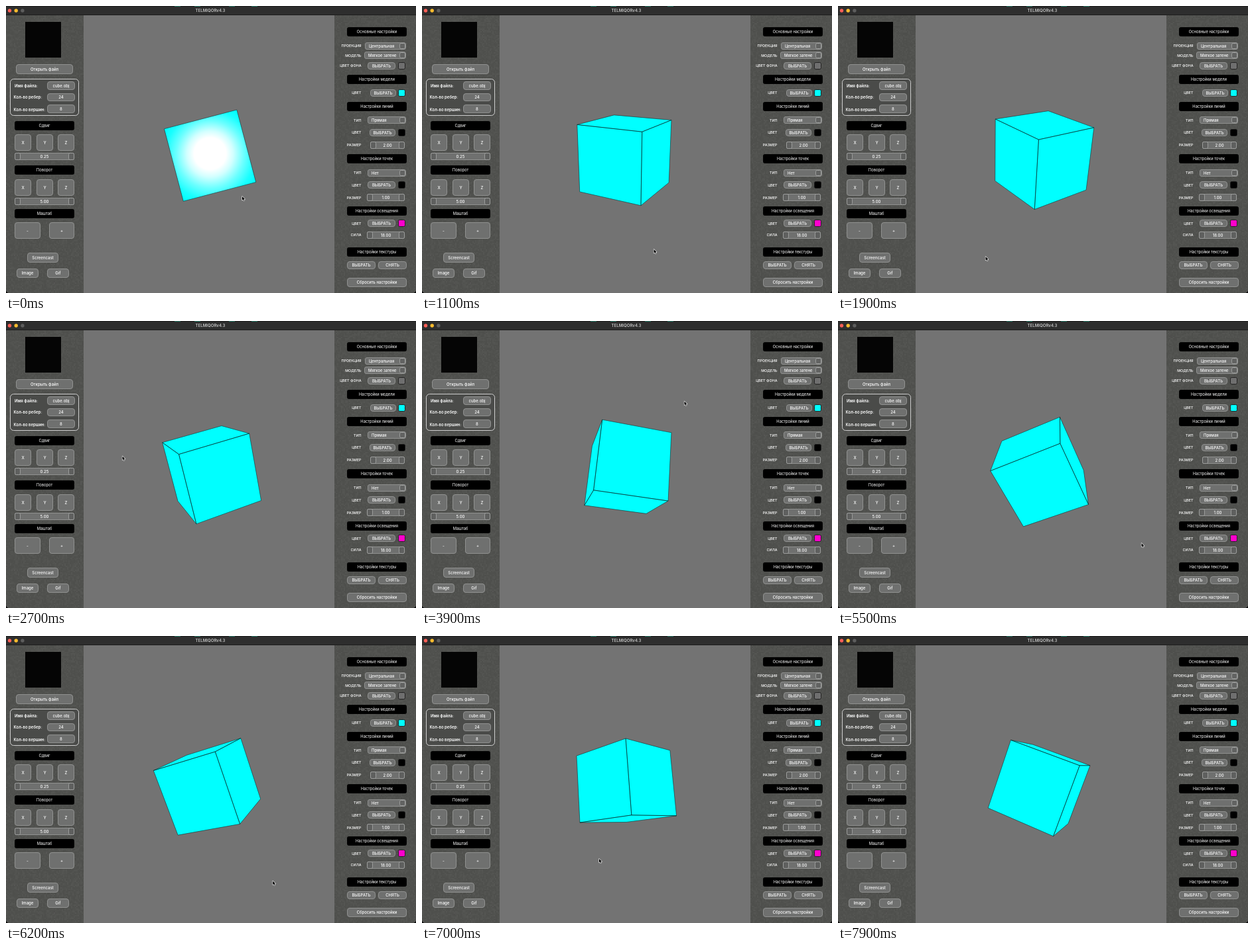
Animation, 618 px wide and 434 px high, one loop 8.5 s. Source, as an HTML page with a canvas:

```html
<!DOCTYPE html>
<html lang="ru">
<head>
<meta charset="utf-8">
<title>Cube</title>
<style>
html, body { margin: 0; width: 100%; height: 100%; overflow: hidden; background: #000; }
canvas { display: block; width: 618px; height: 434px; }
</style>
</head>
<body>
<canvas id="stage" width="618" height="434"></canvas>
<script>
const W = 618, H = 434, LOOP = 8500, STEP = 100;
const FONT = 'Inter, Roboto, sans-serif';
const FILL = '#6f706f', LINE = '#969796';
const view = document.getElementById('stage').getContext('2d');
const panel = document.createElement('canvas');
panel.width = W;
panel.height = H;
const g = panel.getContext('2d');

// ---------- interface helpers ----------
function box(x1, y1, x2, y2, r, fill, line) {
  g.beginPath();
  g.roundRect(x1 + .5, y1 + .5, x2 - x1 - 1, y2 - y1 - 1, r);
  if (fill) { g.fillStyle = fill; g.fill(); }
  if (line) { g.strokeStyle = line; g.lineWidth = .9; g.stroke(); }
}

function label(text, x, y, align = 'center', size = 6, weight = 500, color = '#fff') {
  g.font = `${weight} ${size}px ${FONT}`;
  g.textAlign = align;
  g.textBaseline = 'middle';
  g.fillStyle = color;
  g.fillText(text, x, y + .4);
}

function button(text, x1, y1, x2, y2, size) {
  box(x1, y1, x2, y2, 3.5, FILL, LINE);
  label(text, (x1 + x2) / 2, (y1 + y2) / 2, 'center', size);
}

function header(text, x, y) {
  box(x, y, x + 90, y + 14, 2, '#000', '#000');
  label(text, x + 45, y + 7, 'center', 5.8, 400);
}

function spin(text, x1, y1, x2, y2) {
  box(x1, y1, x2, y2, 2, FILL, LINE);
  box(x1, y1, x1 + 9, y2, 2, '#5f605f', '#a2a3a2');
  box(x2 - 9, y1, x2, y2, 2, '#5f605f', '#a2a3a2');
  label(text, (x1 + x2) / 2, (y1 + y2) / 2);
}

function combo(text, x, y) {
  box(x, y, 603, y + 11, 2.5, FILL, LINE);
  label(text, x + 6, y + 5.5, 'left', 5.9);
  box(593, y + 1, 602, y + 10, 2, '#626362', '#a2a3a2');
}

const caption = (text, y) => label(text, 535.5, y, 'right', 5.4);
const pick = (x1, y, x2) => button('ВЫБРАТЬ', x1, y, x2, y + 11);
const swatch = (y, color) => box(591, y, 602, y + 11, 2, color, '#1c1c1c');

function grain(x1, x2) {
  let seed = 7;
  const rnd = () => (seed = (seed * 16807) % 2147483647) / 2147483647;
  g.fillStyle = '#50514e';
  g.fillRect(x1, 14, x2 - x1, H - 14);
  for (let y = 14; y < H; y += 2)
    for (let x = x1; x < x2; x += 2) {
      const v = rnd() - .5;
      g.fillStyle = `rgba(${v > 0 ? '255,255,250' : '0,0,0'},${Math.abs(v) * .06})`;
      g.fillRect(x, y, Math.min(2, x2 - x), 2);
    }
}

function drawWindow() {
  g.beginPath();
  g.roundRect(0, 0, W, H, [0, 0, 5, 5]);
  g.clip();
  g.fillStyle = '#737373';
  g.fillRect(0, 0, W, H);
  grain(0, 117);
  grain(495, W);
  g.fillStyle = '#2e2e2e';
  g.fillRect(0, 0, W, 14);
  g.fillStyle = '#1d1d1d';
  g.fillRect(0, 0, W, 1);
  g.fillRect(0, 13, W, 1);
  g.fillStyle = '#23705f';
  for (const x of [254, 284, 336, 370]) g.fillRect(x, 0, 9, 1);
  ['#fe5f57', '#febc2e', '#5d5d5d'].forEach((c, i) => {
    g.fillStyle = c;
    g.beginPath();
    g.arc(5.5 + i * 9.7, 7, 2.7, 0, 7);
    g.fill();
  });
  label('TELMIQORv4.3', 308, 6.7, 'center', 6.1, 600, '#c4c4c4');
}

function drawLeft() {
  g.fillStyle = '#050505';
  g.fillRect(29, 24, 54, 54);
  button('Открыть файл', 15, 88, 101, 103);

  box(6, 110, 110, 166, 5, '#4a4b49', '#dcdcdc');
  [['Имя файла:', 'cube.obj', 120.5], ['Кол-во ребер:', '24', 138], ['Кол-во вершин:', '8', 155.5]]
    .forEach(([name, value, y], i) => {
      label(name, i ? 11.5 : 13, y + (i > 1 ? 1 : 0), 'left', 6, 600);
      button(value, 62, Math.round(y - 6.5), 104, Math.round(y + 6));
    });

  header('Сдвиг', 13, 174);
  header('Поворот', 13, 241);
  header('Маштаб', 13, 307);
  for (const y of [194, 262])
    ['X', 'Y', 'Z'].forEach((c, i) => {
      const x = Math.round(13 + i * 32.7);
      button(c, x, y, x + 25, y + 25);
    });
  spin('0.25', 13, 222, 103, 233);
  spin('5.00', 13, 290, 103, 301);
  button('-', 13, 327, 52, 352);
  button('+', 65, 327, 103, 352);
  button('Screencast', 32, 373, 79, 388);
  button('Image', 16, 397, 49, 411);
  button('Gif', 62, 397, 95, 411);
}

function drawRight() {
  header('Основные настройки', 514, 32);
  caption('ПРОЕКЦИЯ', 60);
  combo('Центральная', 541, 55);
  caption('МОДЕЛЬ', 74.5);
  combo('Мягкое затене', 540, 69);
  caption('ЦВЕТ ФОНА', 90);
  pick(545, 85, 587);
  swatch(85, '#6f6f6f');

  header('Настройки модели', 514, 104);
  caption('ЦВЕТ', 131);
  pick(549, 126, 588);
  swatch(126, '#00ffff');

  header('Настройки линий', 514, 145);
  caption('ТИП', 172.5);
  combo('Прямая', 545, 167);
  caption('ЦВЕТ', 191);
  pick(548, 186, 587);
  swatch(186, '#000');
  caption('РАЗМЕР', 210);
  spin('2.00', 549, 205, 601, 216);

  header('Настройки точек', 514, 224);
  caption('ТИП', 252);
  combo('Нет', 545, 247);
  caption('ЦВЕТ', 271);
  pick(545, 265, 587);
  swatch(265, '#000');
  caption('РАЗМЕР', 289.5);
  spin('1.00', 544, 284, 601, 295);

  header('Настройки освещения', 514, 303);
  caption('ЦВЕТ', 328.5);
  pick(545, 323, 587);
  swatch(323, '#ff00cc');
  caption('СИЛА', 346);
  spin('18.00', 544, 341, 601, 352);

  header('Настройки текстуры', 514, 365);
  button('ВЫБРАТЬ', 514, 386, 557, 398);
  button('СНЯТЬ', 561, 386, 604, 398);
  button('Сбросить настройки', 514, 411, 604, 425, 5.9);
}

// ---------- motion ----------
// Rows: time, then the cube's first and second axis (x right, y down, z to the viewer).
const POSES = [
  [0, .967, -.255, 0, .255, .967, 0],
  [1900, .631, .331, .702, -.061, .921, -.384],
  [2700, .339, .226, .913, .203, .926, -.318],
  [3900, .233, -.291, .928, -.09, .948, .305],
  [5500, -.044, .474, .879, .413, .81, -.416],
  [7000, -.673, -.076, .736, .064, .982, .178],
  [7900, -.273, .058, .96, -.343, .933, -.11]
];
// Rows: time, then the pointer tip.
const POINTER = [
  [0, 356, 288], [700, 386, 325], [1300, 322, 384], [1900, 222.5, 379],
  [2300, 178, 300], [2700, 175.5, 204.5], [3300, 275, 130], [3900, 395.5, 121.5],
  [4700, 455, 225], [5500, 457.5, 336], [6300, 390, 371], [7000, 267, 337],
  [7300, 262, 334], [7900, 640, 450]
];

// Cubic Hermite curve through rows of [time, ...values].
function along(rows, t) {
  const last = rows.length - 1;
  t = Math.min(t, rows[last][0]);
  let i = 0;
  while (i < last - 1 && t >= rows[i + 1][0]) i++;
  const a = rows[i], b = rows[i + 1];
  const before = rows[Math.max(i - 1, 0)], after = rows[Math.min(i + 2, last)];
  const d = b[0] - a[0], s = (t - a[0]) / d;
  return a.slice(1).map((p, k) => {
    const q = b[k + 1];
    const m = (q - before[k + 1]) / (b[0] - before[0]) * d;
    const n = (after[k + 1] - p) / (after[0] - a[0]) * d;
    const e = s * s * (3 - 2 * s);
    return p + (q - p) * e + s * (1 - s) * (m * (1 - s) - n * s);
  });
}

// ---------- cube ----------
const CX = 307.6, CY = 226.1, UNIT = 50.8, DIST = 9.8;
const dot = (a, b) => a[0] * b[0] + a[1] * b[1] + a[2] * b[2];
const unit = v => v.map(c => c / Math.hypot(...v));
const cross = (a, b) => [a[1] * b[2] - a[2] * b[1], a[2] * b[0] - a[0] * b[2], a[0] * b[1] - a[1] * b[0]];

function axesAt(t) {
  const v = along(POSES, t);
  const x = unit(v.slice(0, 3)), w = v.slice(3), k = dot(x, w);
  const y = unit(w.map((c, i) => c - k * x[i]));
  return [x, y, cross(x, y)];
}

function project(p) {
  const k = UNIT * DIST / (DIST - p[2]);
  return [CX + p[0] * k, CY + p[1] * k];
}

function shine(n) {
  const k = UNIT * DIST / n[2];
  const x = CX - n[0] * k, y = CY - n[1] * k;
  const glow = view.createRadialGradient(x, y - 3, 24, x, y, 78);
  glow.addColorStop(0, '#ffffff');
  glow.addColorStop(.2, '#d2ffff');
  glow.addColorStop(.5, '#6cffff');
  glow.addColorStop(.8, '#18ffff');
  glow.addColorStop(1, '#00ffff');
  return glow;
}

function drawCube(t) {
  const axes = axesAt(t);
  const faces = [];
  for (let i = 0; i < 3; i++)
    for (const sign of [-1, 1]) {
      const n = axes[i].map(c => c * sign);
      if (n[2] * DIST <= 1) continue;
      const u = axes[(i + 1) % 3], v = axes[(i + 2) % 3];
      const path = new Path2D();
      for (const [a, b] of [[-1, -1], [1, -1], [1, 1], [-1, 1]])
        path.lineTo(...project(n.map((c, k) => c + a * u[k] + b * v[k])));
      path.closePath();
      faces.push(path);
      view.fillStyle = n[2] > .9 ? shine(n) : '#00ffff';
      view.fill(path);
    }
  view.lineWidth = .5;
  view.lineJoin = 'round';
  view.strokeStyle = '#001c1c';
  for (const path of faces) view.stroke(path);
}

function drawPointer(t) {
  const [x, y] = along(POINTER, t);
  view.beginPath();
  for (const [a, b] of [[0, 0], [0, 5.6], [1.3, 4.5], [2.2, 6.5], [3.2, 6], [2.3, 4.1], [4, 4]])
    view.lineTo(x + a, y + b);
  view.closePath();
  view.lineWidth = 1.3;
  view.strokeStyle = '#e8e8e8';
  view.stroke();
  view.fillStyle = '#000';
  view.fill();
}

function frame() {
  const t = Math.floor(performance.now() % LOOP / STEP) * STEP;
  view.clearRect(0, 0, W, H);
  view.drawImage(panel, 0, 0);
  drawCube(t);
  if (t < 7900) drawPointer(t);
  requestAnimationFrame(frame);
}

drawWindow();
drawLeft();
drawRight();
frame();
</script>
</body>
</html>
```
